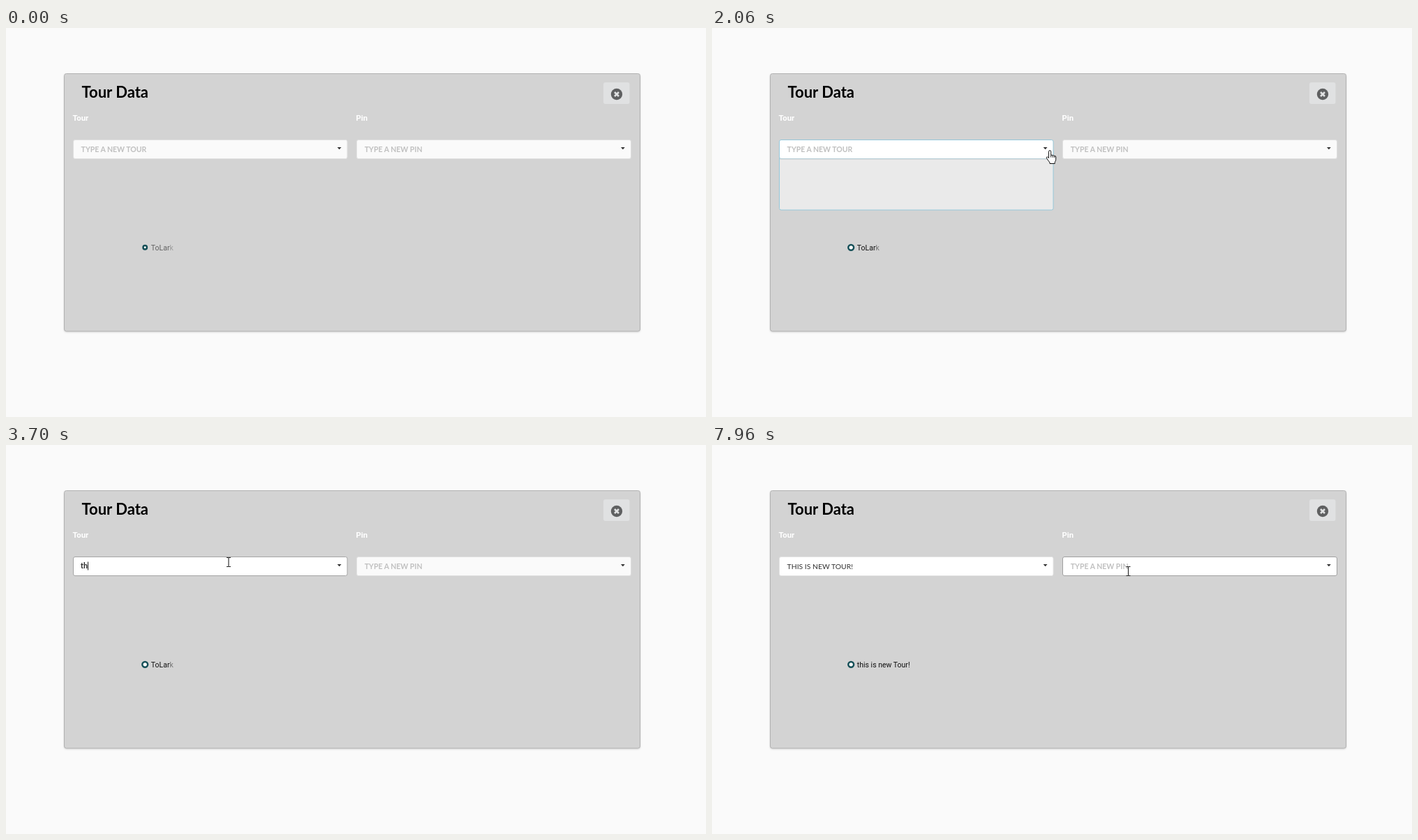
An HTML page that plays this animation: 1003x558 px, repeating every 8 s.

```html
<!DOCTYPE html>
<html lang="en">
<head>
<meta charset="utf-8">
<title>Tour form</title>
<style>
html, body { margin: 0; width: 100%; height: 100%; overflow: hidden; background: #fafafa; }
svg { display: block; }
text { font-family: Lato, sans-serif; white-space: pre; }
.title { font-size: 22px; font-weight: 700; }
.label { font: 700 11.3px Roboto, sans-serif; fill: #fff; }
.hint { font-size: 10.5px; font-weight: 700; fill: #c0c0c0; }
.typed { font-size: 10.5px; font-weight: 700; fill: #222; }
.picked { font-size: 10.4px; fill: #333; }
.item { font-size: 12.2px; fill: #3a3a3a; }
.radio { font: 10.5px Roboto, sans-serif; fill: #111; }
#card { filter: drop-shadow(0 1px 1px rgba(0, 0, 0, .15)); }
.pointer { fill: #fff; stroke: #111; stroke-width: 1; stroke-linejoin: round; }
</style>
</head>
<body>
<svg width="1003" height="558" viewBox="0 0 1003 558">
  <rect id="card" x="83.5" y="65.5" width="825" height="369.5" rx="3" fill="#d3d3d3" stroke="#b2b2b2"/>
  <text class="title" x="108.5" y="100">Tour Data</text>
  <rect x="856" y="78" width="37.5" height="31" rx="3" fill="#e0e1e2"/>
  <circle cx="875" cy="95" r="8.2" fill="#5f6061"/>
  <path d="M872 92l6 6m0-6l-6 6" stroke="#e0e1e2" stroke-width="2.6"/>
  <text class="label" x="95.5" y="133">Tour</text>
  <text class="label" x="501.5" y="133">Pin</text>

  <circle id="ring" cx="199.2" cy="314.8" fill="#fff" stroke="#154f57" stroke-width="2.5"/>
  <text id="radio" class="radio" x="207.8" y="318.5"><tspan></tspan><tspan fill="#777"></tspan></text>

  <g id="menu">
    <rect id="sheet" x="96.5" y="174" width="392.5" rx="2.5" stroke="#96c8da"/>
    <g id="items"></g>
  </g>
  <rect id="tour" x="96.5" y="160.5" width="392.5" height="27" rx="2.5"/>
  <path id="divider" d="M97 188h391.5" stroke="#d0d0d0"/>
  <rect id="pin" x="502.5" y="160.5" width="393" height="27" rx="2.5"/>
  <path d="M474.7 171h5.8l-2.9 3.2zM881 171h5.8l-2.9 3.2z" fill="#333"/>
  <text id="hint" class="hint" x="107.6" y="178">TYPE A NEW TOUR</text>
  <text class="hint" x="513.8" y="178">TYPE A NEW PIN</text>
  <text id="typed" class="typed" x="107" y="177"></text>
  <path id="caret" d="M0 167.5v12" stroke="#222"/>
  <text id="picked" class="picked" x="107.6" y="178">THIS IS NEW TOUR!</text>

  <path id="arrow" class="pointer" d="M0 0V13.6L3.2 10.8L5.6 16L8 15L5.7 9.9H9.6Z"/>
  <g id="hand" class="pointer">
    <path d="M4 11V1.8a1.6 1.6 0 0 1 3.2 0V7q1.4-1 2.6.4 1.6-.8 2.4.6 2-.3 2 1.6V13q0 2-1.5 4v2H5.5v-1.5Q3.5 15 1 11.3.2 9.6 1.8 9.4 3 9.5 4 11Z"/>
    <path d="M7.2 7v3M9.8 7.4v2.8M12.2 8v2.4" fill="none"/>
  </g>
  <path id="beam" d="M-3-6.5h2.2L0-6 .8-6.5H3M0-6V6M-3 6.5h2.2L0 6l.8.5H3" fill="none" stroke="#222" stroke-width="1.1"/>
</svg>
<script>
const LOOP = 8000;
const $ = id => document.getElementById(id);
const set = (id, attrs) => {
  for (const k in attrs) $(id).setAttribute(k, attrs[k]);
};
const show = (id, on) => set(id, { visibility: on ? "visible" : "hidden" });

// Latest entry whose time has come
const at = (steps, t) => steps.filter(s => s[0] <= t).pop();

const pointer = [
  [0, ""],
  [1220, "arrow", 20.5, 174.5], [1370, "arrow", 396, 200],
  [1520, "arrow", 440, 195], [1640, "arrow", 477, 189],
  [1790, "hand", 480, 185], [1910, "hand", 478.5, 175.5],
  [2360, "hand", 474, 181], [2480, "hand", 440, 191], [2600, "hand", 390, 195],
  [2720, "beam", 345, 181], [2840, "beam", 319, 175], [3270, "beam", 319, 168],
  [7410, "arrow", 420, 191], [7530, "arrow", 520, 203], [7650, "arrow", 601, 194],
  [7810, "beam", 597, 188], [7960, "beam", 596.5, 181]
];
const phrase = "this is new Tour!";
const letters = [
  [0, 0], [3700, 2], [3820, 3], [3940, 4], [4060, 6], [4210, 8], [4490, 9],
  [4640, 10], [4790, 12], [5190, 13], [5340, 15], [5460, 16], [5920, 17]
];
const radioGrowth = [
  [0, .3], [130, .65], [280, 1],
  [6320, 0], [6440, .15], [6560, .3], [6710, .6], [6830, .8], [6980, 1]
];
const tourLook = [
  [0, "#fafafa", "#e0e0e0"], [1790, "#fff", "#aaa"], [2060, "#fff", "#96c8da"],
  [3700, "#fff", "#a5a5a5"], [7410, "#fff", "#e4e4e4"]
];
const pinLook = [[0, "#fafafa", "#e0e0e0"], [7810, "#fff", "#a0a0a0"]];

$("items").innerHTML = ["ToLark", "ToMeadow", "ToKV", "ToRidge"].map((name, i) =>
  `<text class="item" x="110" y="${208 + i * 32}"${i ? "" : ' style="fill:#222"'}>${i} : ${name}</text>`).join("");

function drawPointer(t) {
  const [, kind, x, y] = at(pointer, t);
  for (const id of ["arrow", "hand", "beam"]) show(id, id === kind);
  if (kind) set(kind, { transform: `translate(${x} ${y})` });
}

function drawMenu(t) {
  const opening = t < 2210;
  show("menu", t >= 2060 && t < 3700);
  show("divider", t >= 2060 && opening);
  $("items").style.display = opening ? "none" : "";
  set("sheet", { height: opening ? 87 : 141.3, fill: opening ? "#eaeaea" : "#fff" });
}

function drawTour(t) {
  const typing = t >= 3700 && t < 6320;
  show("hint", t < 3700);
  $("hint").style.fill = t >= 2360 ? "#777" : "";
  show("typed", typing);
  show("caret", typing);
  show("picked", t >= 6320);
  $("typed").textContent = phrase.slice(0, at(letters, t)[1]);
  if (typing) {
    const x = Math.round(107 + $("typed").getComputedTextLength()) + .5;
    set("caret", { transform: `translate(${x} 0)` });
  }
}

function drawRadio(t) {
  const grown = at(radioGrowth, t)[1];
  const [main, tail] = t < 6320 ? ["ToLar", "k"] : [phrase, ""];
  const spans = $("radio").children;
  spans[0].textContent = main;
  spans[1].textContent = tail;
  set("radio", { opacity: .4 + .6 * grown });
  set("ring", { r: 2.2 + 1.7 * grown });
}

function drawField(id, look, t) {
  const [, fill, stroke] = at(look, t);
  set(id, { fill, stroke });
}

function frame(now) {
  const t = now % LOOP;
  drawField("tour", tourLook, t);
  drawField("pin", pinLook, t);
  drawMenu(t);
  drawTour(t);
  drawRadio(t);
  drawPointer(t);
  requestAnimationFrame(() => frame(performance.now() - start));
}
const start = performance.now();
frame(0);
</script>
</body>
</html>
```
